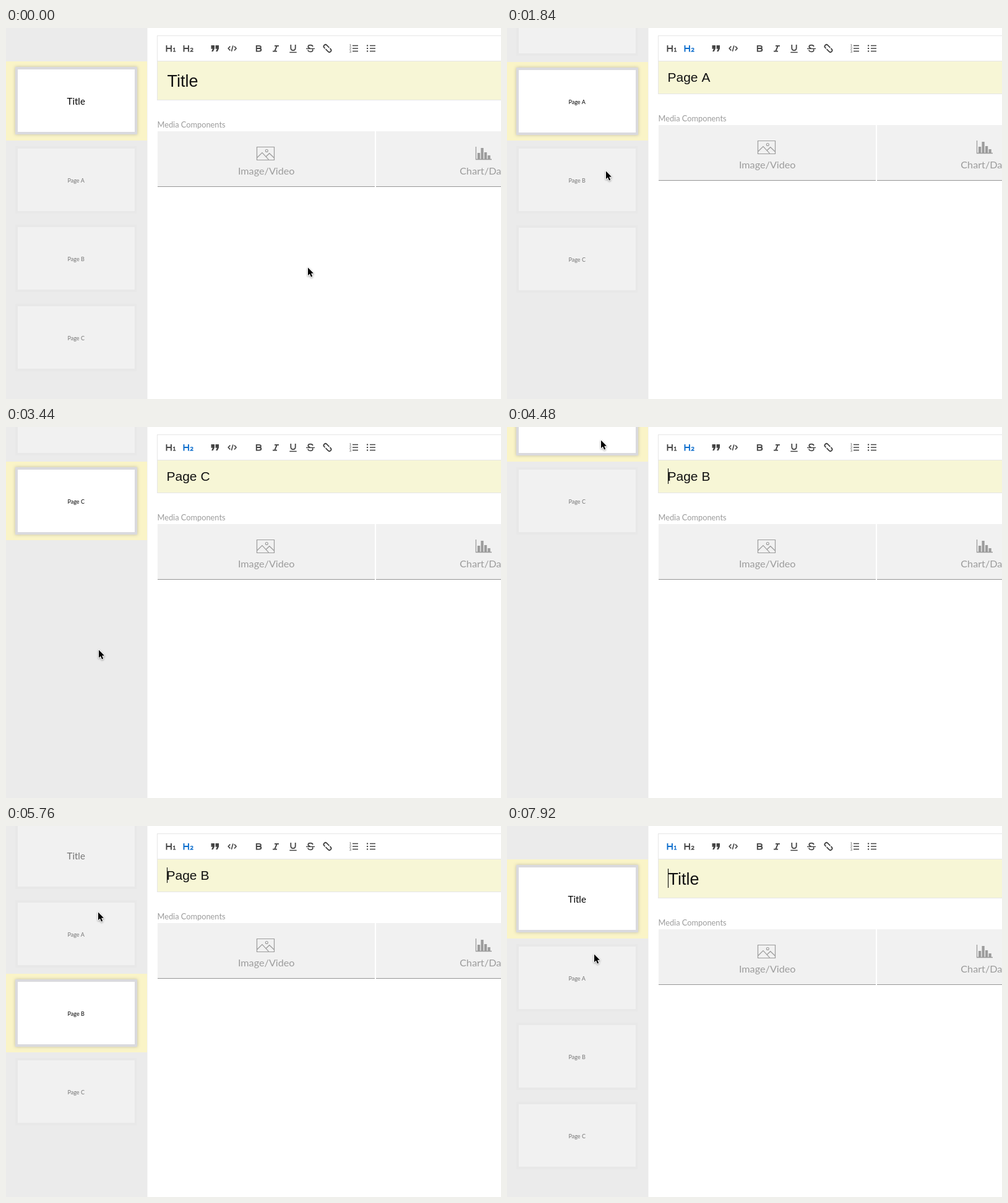
Animation of 800 by 600 pixels, one loop 8000 ms. Source, as an HTML page with a canvas:

```html
<!DOCTYPE html>
<html lang="en">
<head>
<meta charset="utf-8">
<title>Page navigator</title>
<style>
html, body { margin: 0; width: 100%; height: 100%; overflow: hidden; background: #fff; }
canvas { display: block; }
</style>
</head>
<body>
<canvas id="stage" width="800" height="600"></canvas>
<script>
const ctx = document.getElementById('stage').getContext('2d');
const LOOP = 8000, STEP = 80;
const PITCH = 127.5;
const INK = '#444', BLUE = '#0a6ccc', GREY = '#9c9c9c';
const LATO = 'Lato, sans-serif', SANS = '"Liberation Sans", Arial, sans-serif';
const pages = ['Title', 'Page A', 'Page B', 'Page C'];

// time, selected page, start of the caret blink
const picks = [[0, 0, Infinity], [1440, 1, 1360], [2960, 3, 2960], [4480, 2, 4400], [6800, 0, 6800]];
// start, duration, scroll offset reached
const scrolls = [[1440, 132, 127], [2960, 132, 381], [4480, 132, 254], [5360, 400, 70.5], [6800, 132, 0]];
// time, x, y of the pointer tip
const moves = [
  [0, 488, 388], [70, 488, 388], [320, 392, 318], [560, 222, 200], [720, 154, 172], [880, 152, 210],
  [1040, 160, 232], [2080, 160, 232], [2560, 150, 361], [3520, 150, 361], [4160, 152, 22],
  [4480, 152, 22], [4640, 152, 37], [4960, 152, 37], [5120, 150, 160], [5280, 150, 160],
  [5360, 149, 140], [6240, 149, 140], [6480, 150, 80], [7200, 150, 80], [7520, 140, 150],
  [7760, 141, 208], [8000, 141, 208]
];
const clicks = [1200, 2800, 4240, 6560];

const clamp = v => Math.max(0, Math.min(1, v));
const swing = p => 0.5 - Math.cos(Math.PI * clamp(p)) / 2;
const lastBefore = (list, t) => list.filter(e => e[0] <= t).pop();

function scrollAt(t) {
  let y = 0;
  for (const [start, span, end] of scrolls) y += (end - y) * swing((t - start) / span);
  return y;
}

function pointerAt(t) {
  const i = Math.max(1, moves.findIndex(m => m[0] >= t));
  const [t0, x0, y0] = moves[i - 1], [t1, x1, y1] = moves[i];
  let p = clamp((t - t0) / (t1 - t0));
  if (t1 - t0 >= 400) p = swing(p);
  return [x0 + (x1 - x0) * p, y0 + (y1 - y0) * p];
}

function rect(x, y, w, h, color) {
  ctx.fillStyle = color;
  ctx.fillRect(x, y, w, h);
}

function text(str, x, y, size, color, family = LATO, align = 'center') {
  ctx.font = `${size}px ${family}`;
  ctx.textAlign = align;
  ctx.textBaseline = 'alphabetic';
  ctx.fillStyle = color;
  ctx.fillText(str, x, y);
}

function stroke(d, color = INK, width = 2, cap = 'butt') {
  ctx.strokeStyle = color;
  ctx.lineWidth = width;
  ctx.lineCap = cap;
  ctx.lineJoin = cap === 'round' ? 'round' : 'miter';
  ctx.stroke(new Path2D(d));
}

function fill(d, color = INK) {
  ctx.fillStyle = color;
  ctx.fill(new Path2D(d));
}

function card(i, top, active) {
  const y = Math.round(top), h = Math.round(top + PITCH) - y;
  if (active) {
    rect(0, y, 228, h, '#faf4c7');
    ctx.save();
    ctx.shadowColor = 'rgba(90,90,110,.35)';
    ctx.shadowBlur = 5;
    rect(15, y + 9, 197, 109, '#dadade');
    ctx.restore();
  } else {
    rect(15, y + 9, 196, 109, '#e8e8e8');
  }
  rect(19, y + 13, 189, 101, active ? '#fff' : '#f1f1f1');
  const big = i === 0;
  text(pages[i], 113.2, y + (big ? 69.5 : 67.5), big ? 15 : 9, active ? '#000' : '#747474');
}

function sidebar(t, page) {
  ctx.save();
  ctx.beginPath();
  ctx.rect(0, 0, 228.5, 600);
  ctx.clip();
  rect(0, 0, 229, 600, '#ebebeb');
  const scroll = scrollAt(t);
  pages.forEach((_, i) => card(i, 54 + i * PITCH - scroll, i === page));
  ctx.restore();
}

function heading(x, digit, color) {
  stroke(`M${x + 1} 28V38.4M${x + 8.4} 28V38.4M${x + 1} 33H${x + 8.4}`, color, 1.9);
  const d = x + 11.5;
  if (digit === 1) stroke(`M${d} 33.6L${d + 2.2} 32.6V38.4M${d} 37.8H${d + 4.2}`, color, 1.3);
  else stroke(`M${d} 33.8Q${d + .4} 32.6 ${d + 2.2} 32.6Q${d + 4} 32.7 ${d + 3.8} 34.3Q${d + 3.4} 35.4 ${d + .4} 37.7H${d + 4.6}`, color, 1.4);
}

function toolbar(level) {
  heading(258.5, 1, level === 1 ? BLUE : INK);
  heading(286.5, 2, level === 2 ? BLUE : INK);
  for (const x of [331.5, 338.5]) fill(`M${x} 28H${x + 5.5}V33.5L${x + 3.2} 38H${x + .6}L${x + 2.5} 33.8H${x}Z`);
  stroke('M362.3 29.6L359.2 33L362.3 36.4M369 29.6L372.1 33L369 36.4M367 28.5L364.4 37.7', INK, 1.6);
  stroke('M404.8 28.9H408.6C413 28.9 413 33 408.6 33H404.8M408.6 33C413.6 33 413.6 37.6 408.6 37.6H404.8M404.8 28V38.5', INK, 1.9);
  stroke('M434 28.9H441M431 37.6H438M437.8 28.9L434.2 37.6', INK, 1.9);
  stroke('M460.3 27V32.3C460.3 37.5 467.7 37.5 467.7 32.3V27', INK, 1.8);
  stroke('M458.3 39.4H469.7', INK, 1.5);
  stroke('M495.8 30.2C495.4 26.8 488.3 26.9 488.3 30.2C488.3 31.6 489.5 32.4 491.5 33M488 35.5C488.4 39.3 496 39.2 495.8 35.7C495.7 35 495.5 34.6 495.2 34.2', INK, 1.7);
  stroke('M485 33.4H499', INK, 1.4);
  ctx.save();
  ctx.translate(519.5, 33);
  ctx.rotate(Math.PI / 4);
  stroke('M1.2 -2.9H-4.4A2.9 2.9 0 0 0 -4.4 2.9H-2.6M-1.2 2.9H4.4A2.9 2.9 0 0 0 4.4 -2.9H2.6', INK, 1.8);
  ctx.restore();
  for (const y of [28.5, 33, 37.5]) {
    stroke(`M560 ${y}H569M588 ${y}H597`, INK, 1.6);
    rect(583, y - 1, 2.2, 2, INK);
  }
  ['1', '2', '3'].forEach((n, i) => text(n, 556.5, 30.3 + i * 4.7, 5.5, INK, SANS));
}

function component(x, y, label) {
  rect(x, y, 351, 89, '#f1f1f1');
  rect(x, y + 89, 351, 1, '#959595');
  text(label, x + 175.7, y + 70, 16.2, GREY);
}

function media(dy) {
  const y = 167 + dy;
  text('Media Components', 244.5, y - 6.5, 12.8, GREY, LATO, 'left');
  component(245, y, 'Image/Video');
  component(598, y, 'Chart/Data');
  ctx.save();
  ctx.translate(0, y);
  stroke('M405.5 25.5H433.5V46.5H405.5Z', GREY, 1.2);
  stroke('M406 42.5L414 34.5L424.5 45.8M420.2 41L425.7 35.7L433 42.7', GREY, 1.2);
  stroke('M423.3 31.5A2 2 0 1 1 419.3 31.5A2 2 0 1 1 423.3 31.5Z', GREY, 1.1);
  stroke('M759.5 25V45.5H785', GREY, 1.3);
  [[762, 10], [767.5, 18], [773, 11], [778.5, 6]].forEach(([x, h]) => rect(x, 45 - h, 4.2, h, GREY));
  ctx.restore();
}

function editor(t, page, blink) {
  const big = page === 0, focused = t >= blink;
  const bottom = big ? 116 : 106;
  rect(244, 12, 556, bottom - 11, '#e6e6e6');
  rect(245, 13, 555, 40, '#fff');
  rect(245, 54, 555, bottom - 54, '#f7f6d6');
  toolbar(focused ? (big ? 1 : 2) : 0);
  text(pages[page], big ? 260.5 : 259.5, big ? 94.5 : 87, big ? 27 : 21, '#111', SANS, 'left');
  if (focused && Math.floor((t - blink) / 480) % 2 === 0) rect(260, big ? 69 : 67, 1, big ? 31 : 25, '#000');
  media(big ? 0 : -10);
}

function pointer(t) {
  const [x, y] = pointerAt(t);
  if (clicks.includes(t)) {
    ctx.beginPath();
    ctx.arc(x, y, 22, 0, 2 * Math.PI);
    ctx.strokeStyle = 'rgba(110,110,110,.4)';
    ctx.lineWidth = 2;
    ctx.stroke();
  }
  ctx.save();
  ctx.translate(x, y);
  const arrow = 'M0 -.5V12.3L2.9 9.6L5 14.6L7.2 13.7L5.1 8.8H9Z';
  ctx.shadowColor = 'rgba(0,0,0,.4)';
  ctx.shadowBlur = 3;
  ctx.shadowOffsetY = 1;
  stroke(arrow, '#fff', 1.8, 'round');
  ctx.shadowColor = 'transparent';
  fill(arrow, '#000');
  ctx.restore();
}

function draw(now) {
  const t = Math.floor((now % LOOP) / STEP) * STEP;
  const [, page, blink] = lastBefore(picks, t);
  rect(0, 0, 800, 600, '#fff');
  sidebar(t, page);
  editor(t, page, blink);
  pointer(t);
}

let origin;
function tick(now) {
  origin ??= now;
  draw(Math.max(0, now - origin));
  requestAnimationFrame(tick);
}
draw(0);
requestAnimationFrame(tick);
</script>
</body>
</html>
```
